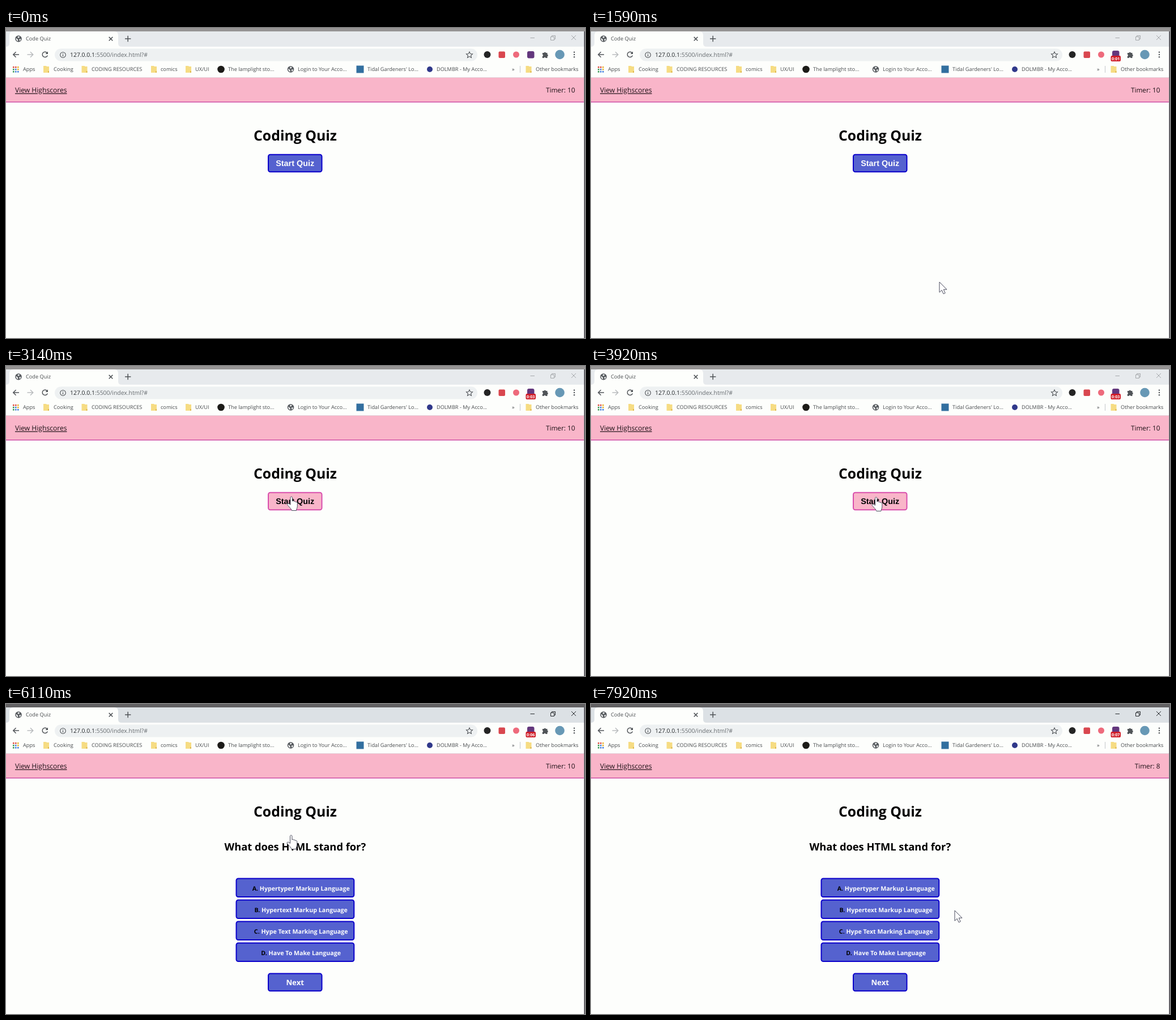
Recreate the animation shown at these times as an HTML page. Size 1022x548 px, loop 7990 ms.

```html
<!DOCTYPE html>
<html lang="en">
<head>
<meta charset="utf-8">
<title>Code Quiz</title>
<style>
  html, body { margin: 0; width: 100%; height: 100%; overflow: hidden; background: #fdfefc; }
  svg { display: block; width: 1022px; height: 548px; }
  text { font-family: "Open Sans", "Noto Sans", sans-serif; text-rendering: geometricPrecision; white-space: pre; }
  .ui { font-size: 9.2px; fill: #484b4e; }
  .page { font-size: 12.1px; fill: #1c1015; }
  .bold { font-weight: 700; }
  .mid { text-anchor: middle; }
  .button rect { fill: #5562cf; stroke: #0b00cb; stroke-width: 2; }
  .button text { fill: #fdfefc; font-weight: 700; text-anchor: middle; }
  .button.hover rect { fill: #f9b5c9; stroke: #d94fad; }
  .button.hover text { fill: #000; }
  .button.pressed rect { stroke: #26092f; }
  .line { fill: none; stroke: #505458; stroke-width: 1.5; }
  .cursor { fill: #fff; stroke: #494b5c; stroke-width: 1; stroke-linejoin: round; }
</style>
</head>
<body>
<svg id="stage" viewBox="0 0 1022 548">
  <defs>
    <g id="globe">
      <circle r="5.8" fill="#55595d"/>
      <path d="M-4.4-1.6L-1 1.2-.8 4.3C-3.2 3.8-4.6 1.6-4.4-1.6ZM-1.2-4.3L2.2-4 1.2-1.8-1.2-1.2ZM1.2 .6L4.4 .2C4.3 2.2 3.2 3.4 2 4Z" fill="#eef0f0"/>
    </g>
    <g id="folder">
      <path d="M-5-6H0L1-5H5V6H-5Z" fill="#f6dc83"/>
      <path d="M3 6V3H5V6Z" fill="#dfb94f"/>
    </g>
  </defs>

  <rect width="1022" height="548" fill="#fdfefc"/>
  <rect id="strip" y="5" width="1022" height="28"/>
  <rect id="edge" width="1022" height="6"/>

  <path d="M0 33Q6 33 6 27V13Q6 6 13 6H191Q198 6 198 13V27Q198 33 204 33Z" fill="#fdfefc"/>
  <use href="#globe" x="22" y="19"/>
  <text class="ui" x="35" y="22.3">Code Quiz</text>
  <path class="line" d="M181.7 15.9L188.3 22.5M188.3 15.9L181.7 22.5M210 19H220.4M215.2 13.8V24.2"/>
  <g id="controls" fill="none" stroke-width="1">
    <path d="M925.5 17.5H933M961.5 15.5H967.5V21.5H961.5ZM963.5 15.5V13.5H969.5V19.5H967.5M998 13L1006 21M1006 13L998 21"/>
  </g>

  <path class="line" d="M23 47H13M17.6 42.2L12.8 47 17.6 51.8"/>
  <path class="line" style="stroke:#b9bcbe" d="M37.5 47H47.5M43 42.2L47.8 47 43 51.8"/>
  <path class="line" d="M72.6 44A4.7 4.7 0 1 0 73.3 48.5"/>
  <path d="M74 41.5V46H69.5Z" fill="#505458"/>

  <rect x="86" y="36.5" width="746" height="22" rx="11" fill="#eef1f2"/>
  <circle class="line" cx="100.5" cy="47.5" r="4.8" style="stroke-width:1.1"/>
  <path class="line" style="stroke-width:1.2" d="M100.5 46.8V50.3M100.5 44.5V45.7"/>
  <text x="113" y="51" font-size="10.4" fill="#222629">127.0.0.1<tspan fill="#666b6f">:5500/index.html?#</tspan></text>
  <path class="line" style="stroke-width:1.1" d="M818 42L819.6 45.6 823.5 46 820.6 48.6 821.4 52.4 818 50.4 814.6 52.4 815.4 48.6 812.5 46 816.4 45.6Z"/>

  <circle cx="849.5" cy="47" r="6" fill="#242424"/>
  <rect x="869.5" y="41.5" width="11.5" height="11.5" rx="2" fill="#d9474f"/>
  <circle cx="900.5" cy="47" r="5.5" fill="#ee6a7c"/>
  <rect id="recorder" x="920" y="41" width="12.5" height="12.5" rx="3" fill="#63377d"/>
  <g id="badge">
    <rect x="917.5" y="49" width="17.5" height="10" rx="2" fill="#d01f2a"/>
    <text id="clock" class="bold mid" x="926.3" y="56.7" font-size="7.2" fill="#fff"></text>
  </g>
  <path d="M947 44H949.5A1.9 1.9 0 0 1 953 44H955.5V46.6A1.9 1.9 0 0 1 955.5 50.2V53H952.6A1.7 1.7 0 0 0 949.4 53H946.8V50A1.8 1.8 0 0 0 946.8 46.6Z" fill="#505458"/>
  <circle cx="977.5" cy="47" r="8.3" fill="#6798b5"/>
  <g fill="#505458"><circle cx="1003" cy="42.8" r="1.2"/><circle cx="1003" cy="47" r="1.2"/><circle cx="1003" cy="51.2" r="1.2"/></g>

  <g id="bookmarks"></g>
  <path d="M907.5 67V79" stroke="#c4c7c9"/>

  <rect y="87" width="1022" height="1" fill="#e4d5db"/>
  <rect y="88" width="1020" height="43" fill="#f9b5c9"/>
  <rect y="130" width="1020" height="1.6" fill="#d254a7"/>
  <text class="page" x="16" y="114.4" text-decoration="underline">View Highscores</text>
  <text id="timer" class="page" x="1004.5" y="114.4" text-anchor="end" style="font-size:11.8px"></text>
  <text class="bold mid" x="510.5" y="199.4" font-size="24.8">Coding Quiz</text>

  <g id="intro"></g>
  <g id="quiz">
    <text class="bold mid" x="510.3" y="259.3" font-size="18.3">What does HTML stand for?</text>
  </g>
  <rect x="1020.4" y="6" width="1.6" height="542" fill="#44434a"/>

  <path id="arrow" class="cursor" d="M0 0V18.3L4.2 14.4 7.2 21 10.2 19.6 7.3 13.2H13Z"/>
  <path id="hand" class="cursor" d="M0 1.8C0-.6 3.4-.6 3.4 1.8V8C4.2 6.8 6.3 7.1 6.6 8.7 7.6 7.8 9.3 8.2 9.6 9.8 10.8 9.1 12.3 9.8 12.3 11.4V17C12.3 20 10.7 21.2 10.4 24.5H2.3C2 21.6-3.2 17.5-5.4 14.2-6.2 12.4-4-11.4 0 14.3Z"/>
</svg>
<script>
const LOOP = 7990;
const PRESS_AT = 5300, QUIZ_AT = 5520;
const $ = id => document.getElementById(id);
const add = (parent, markup) => parent.insertAdjacentHTML("beforeend", markup);

$("hand").setAttribute("d",
  "M0 1.8C0-.6 3.4-.6 3.4 1.8V8C4.2 6.8 6.3 7.1 6.6 8.7 7.6 7.8 9.3 8.2 9.6 9.8 " +
  "10.8 9.1 12.3 9.8 12.3 11.4V17C12.3 20 10.7 21.2 10.4 24.5H2.3C2 21.6-3.2 17.5-5.4 14.2-6 12-3 11 0 14.3Z");

const icons = {
  folder: x => `<use href="#folder" x="${x}" y="73"/>`,
  globe: x => `<use href="#globe" x="${x}" y="73"/>`,
  disc: (x, color, r) => `<circle cx="${x}" cy="73" r="${r}" fill="${color}"/>`,
  square: (x, color) => `<rect x="${x - 6.5}" y="66.5" width="13" height="13" fill="${color}"/>`
};
const bookmarks = [
  [30, "Apps"],
  [84, "Cooking", icons.folder(71)],
  [151, "CODING RESOURCES", icons.folder(138.5)],
  [273, "comics", icons.folder(261)],
  [334, "UX/UI", icons.folder(322)],
  [392, "The lamplight sto...", icons.disc(379.5, "#1c1b18", 6.3)],
  [515, "Login to Your Acco...", icons.globe(502.5)],
  [638, "Tidal Gardeners' Lo...", icons.square(625, "#326f9f")],
  [760, "DOLMBR - My Acco...", icons.disc(748, "#30388a", 5)],
  [893, "»"],
  [935, "Other bookmarks", icons.folder(922.5)]
];
for (const [x, label, icon = ""] of bookmarks)
  add($("bookmarks"), `${icon}<text class="ui" x="${x}" y="76.2">${label}</text>`);

const gridColors = ["#de4b3e", "#de4b3e", "#e9b52f", "#3c9a59", "#4480dd", "#e9b52f", "#3c9a59", "#4480dd", "#4480dd"];
gridColors.forEach((color, i) => add($("bookmarks"),
  `<rect x="${12 + i % 3 * 4}" y="${68 + Math.floor(i / 3) * 4}" width="2.6" height="2.6" fill="${color}"/>`));

const buttons = [];
function addButton(parent, x, y, w, h, label, textX, baseline, size, font = "") {
  add(parent, `<g class="button"><rect x="${x}" y="${y}" width="${w}" height="${h}" rx="3.5"/>` +
    `<text x="${textX}" y="${baseline}" style="font-size:${size}px;${font}">${label}</text></g>`);
  buttons.push({ node: parent.lastElementChild, parent, x, y, w, h });
}
addButton($("intro"), 463, 223.8, 94.5, 30.5, "Start Quiz", 510.2, 243.5, 14.4,
  "font-family:'Liberation Sans',Arial,sans-serif");
["Hypertyper Markup Language", "Hypertext Markup Language", "Hype Text Marking Language", "Have To Make Language"]
  .forEach((answer, i) => {
    const y = 308.5 + i * 38;
    addButton($("quiz"), 406.5, y, 207.8, 32.6,
      `<tspan fill="#000">${"ABCD"[i]}.</tspan> ${answer}`, 520.7, y + 21.4, 10.65);
  });
addButton($("quiz"), 463, 476.6, 94.5, 30.6, "Next", 510.2, 496.6, 13.2);

// Pointer waypoints: time, x, y
const path = [
  [1100, 668, 552], [1500, 615, 449], [1650, 615, 449], [2400, 545, 302],
  [2800, 502, 231], [3200, 502, 231], [3300, 501.5, 232], [6500, 501.5, 232],
  [7000, 632, 285], [7500, 642, 365]
];
function pointerAt(t) {
  if (t < path[0][0]) return null;
  const next = path.findIndex(p => p[0] > t);
  if (next < 0) return path.at(-1).slice(1);
  const [t0, x0, y0] = path[next - 1], [t1, x1, y1] = path[next];
  const u = (t - t0) / (t1 - t0), k = u * u * (3 - 2 * u);
  return [x0 + (x1 - x0) * k, y0 + (y1 - y0) * k];
}
const show = (node, on) => node.setAttribute("display", on ? "inline" : "none");

function draw(t) {
  const active = t >= PRESS_AT, quiz = t >= QUIZ_AT;
  $("strip").setAttribute("fill", active ? "#dce1e5" : "#e7eaed");
  $("edge").setAttribute("fill", active ? "#626163" : "#969494");
  $("controls").setAttribute("stroke", active ? "#25282b" : "#a5a8ab");

  const seconds = Math.floor(t / 1000);
  show($("badge"), seconds > 0);
  $("recorder").setAttribute("y", seconds > 0 ? 40 : 41);
  $("clock").textContent = `0:0${seconds}`;
  $("timer").textContent = `Timer: ${10 - Math.max(0, Math.floor((t - QUIZ_AT) / 1000))}`;

  show($("intro"), !quiz);
  show($("quiz"), quiz);

  const pointer = pointerAt(t);
  let hovering = false;
  for (const { node, parent, x, y, w, h } of buttons) {
    const over = !!pointer && (parent.id === "quiz") === quiz &&
      pointer[0] > x && pointer[0] < x + w && pointer[1] > y && pointer[1] < y + h;
    node.classList.toggle("hover", over);
    node.classList.toggle("pressed", over && active);
    hovering ||= over;
  }
  const hand = hovering || (quiz && t < 6500);
  show($("hand"), pointer && hand);
  show($("arrow"), pointer && !hand);
  if (pointer)
    $(hand ? "hand" : "arrow").setAttribute("transform", `translate(${pointer[0]} ${pointer[1]})`);
}

const start = performance.now();
function tick() {
  draw((performance.now() - start) % LOOP);
  requestAnimationFrame(tick);
}
tick();
</script>
</body>
</html>
```
